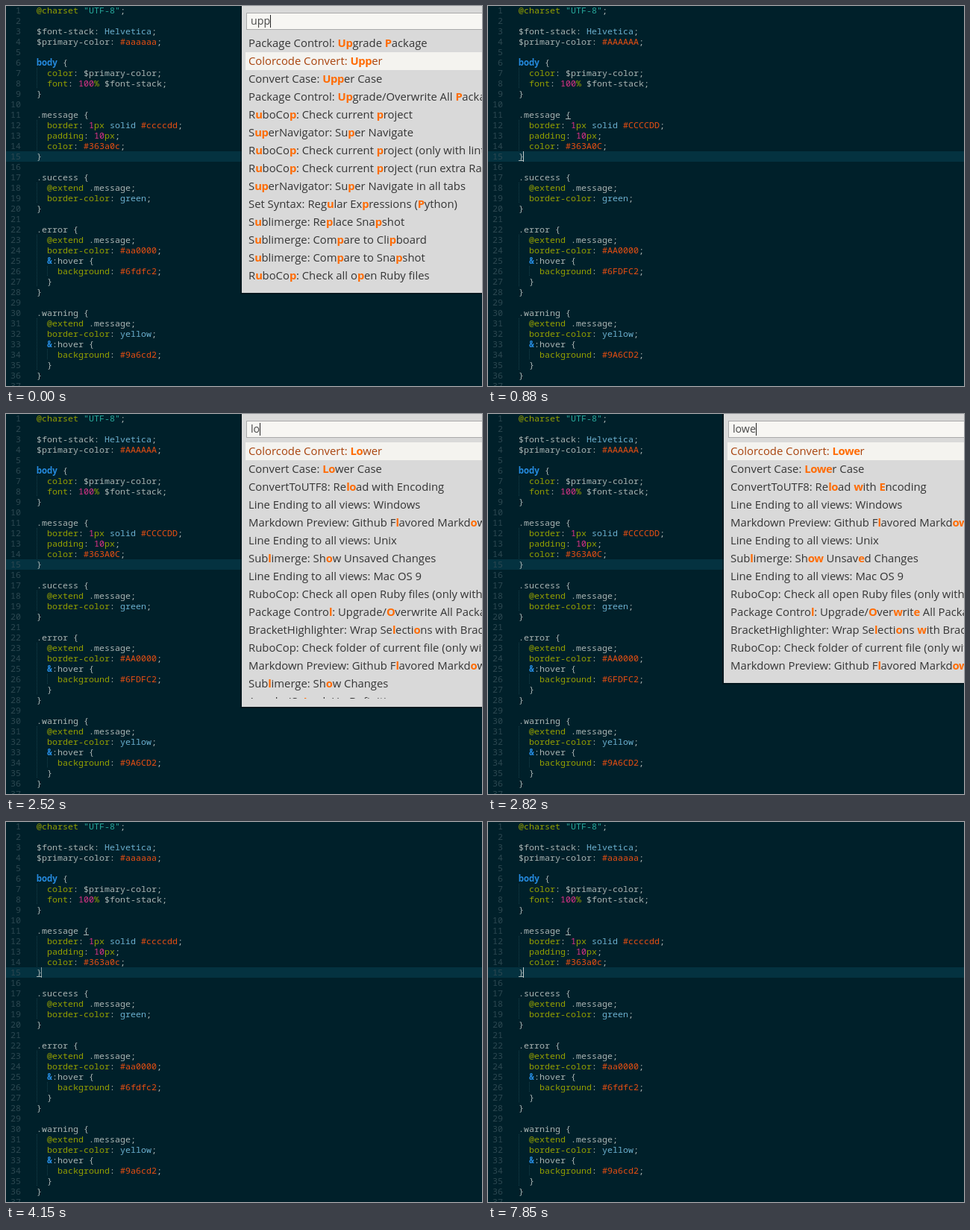
Write an HTML page that moves like this. It is 638 px wide and 510 px high and loops after 8 s.

```html
<!DOCTYPE html>
<html lang="en">
<head>
<meta charset="utf-8">
<title>Colour code case conversion</title>
<style>
  html, body { margin: 0; width: 100%; height: 100%; overflow: hidden; background: #00202a; }
  svg { display: block; width: 638px; height: 510px; }
  text { white-space: pre; }
  .code { font: 11.667px "Noto Sans Mono", monospace; fill: #a9b4b3; }
  .num { fill: #2c4851; text-anchor: end; }
  .str { fill: #27aa9d; }
  .hex { fill: #e84f12; }
  .dig { fill: #dc3388; }
  .prop, .unit { fill: #94a000; }
  .tag { fill: #258be0; font-weight: 700; }
  .word { fill: #6cb1d0; }
  .guide { stroke: #17404a; stroke-dasharray: 1 1; }
  .item { font: 14.85px "Open Sans", "Noto Sans", sans-serif; fill: #353535; }
  .item.on { fill: #a8420c; }
  .hit { fill: #ff6c05; font-weight: 700; letter-spacing: -.4px; }
  .query { font: 14.2px "Open Sans", "Noto Sans", sans-serif; fill: #484848; }
</style>
</head>
<body>
<svg viewBox="0 0 638 510">
  <clipPath id="view"><rect id="viewBox" x="318" y="38" width="320"/></clipPath>
  <rect width="638" height="510" fill="#00202a"/>
  <rect y="195" width="638" height="14" fill="#043240"/>
  <g id="editor"></g>
  <g id="focus" fill="#a9b4b3">
    <rect x="104" y="151" width="7" height="1"/>
    <rect x="41" y="207" width="7" height="1"/>
    <rect id="caret" x="47" y="195" width="1" height="14" fill="#c3cccb"/>
  </g>
  <g id="panel">
    <rect id="shade" x="314" y="-4" width="340" fill="#000" opacity=".3"/>
    <rect id="sheet" x="316" y="-4" width="340" fill="#d9d9d9"/>
    <rect x="322.5" y="9.5" width="340" height="22" fill="#f7f6f3" stroke="#aaa"/>
    <text id="query" class="query" x="328" y="25"></text>
    <rect id="bar" y="12" width="1" height="17" fill="#222"/>
    <g id="list" clip-path="url(#view)"></g>
  </g>
</svg>
<script>
const LOOP = 8000, ROW = 24, TOP = 38;
const $ = id => document.getElementById(id);

function add(parent, tag, attrs, text = '') {
  const el = document.createElementNS('http://www.w3.org/2000/svg', tag);
  for (const key in attrs) el.setAttribute(key, attrs[key]);
  el.textContent = text;
  return parent.appendChild(el);
}

const source = `@charset "UTF-8";

$font-stack: Helvetica;
$primary-color: #aaaaaa;

body {
  color: $primary-color;
  font: 100% $font-stack;
}

.message {
  border: 1px solid #ccccdd;
  padding: 10px;
  color: #363a0c;
}

.success {
  @extend .message;
  border-color: green;
}

.error {
  @extend .message;
  border-color: #aa0000;
  &:hover {
    background: #6fdfc2;
  }
}

.warning {
  @extend .message;
  border-color: yellow;
  &:hover {
    background: #9a6cd2;
  }
}
`;

const token = new RegExp([
  '(?<str>"[^"]*")', '(?<hex>#[0-9a-f]{6})', '(?<plain>\\$[\\w-]+|[.:]\\w+)',
  '(?<dig>\\d+)', '(?<unit>px|%)', '(?<tag>body|&)',
  '(?<prop>@\\w+|[a-z-]+(?=:))', '(?<word>[\\w-]+)', '(?<rest>[^\\w]?)'
].join('|'), 'g');

source.split('\n').forEach((line, i) => {
  const g = $('editor'), top = 14 * i - 1, y = top + 11;
  const indent = line.search(/\S|$/);
  add(g, 'text', { class: 'code num', x: 20, y }, i + 1);
  for (let k = 0; k < indent; k += 2) {
    const x = 41.5 + 7 * k;
    add(g, 'line', { class: 'guide', x1: x, x2: x, y1: top, y2: top + 14 });
  }
  const row = add(g, 'text', { class: 'code', x: 41 + 7 * indent, y });
  for (const m of line.trim().matchAll(token)) {
    const kind = Object.keys(m.groups).find(k => m.groups[k]);
    if (kind) add(row, 'tspan', { class: kind }, m[0]);
  }
});
const hexes = [...document.querySelectorAll('.hex')];

// Square brackets mark the matched letters.
const upp = `Package Control: [Up]grade [P]ackage
Colorcode Convert: [Upp]er
Convert Case: [Upp]er Case
Package Control: [Up]grade/Overwrite All [P]ackages
R[u]boCo[p]: Check current [p]roject
S[up]erNavigator: Su[p]er Navigate
R[u]boCo[p]: Check current [p]roject (only with lint cops)
R[u]boCo[p]: Check current [p]roject (run extra Rails cops)
S[up]erNavigator: Su[p]er Navigate in all tabs
Set Syntax: Reg[u]lar Ex[p]ressions ([P]ython)
S[u]blimerge: Re[p]lace Sna[p]shot
S[u]blimerge: Com[p]are to Cli[p]board
S[u]blimerge: Com[p]are to Sna[p]shot
R[u]boCo[p]: Check all o[p]en Ruby files`;

const uppe = `Colorcode Convert: [Uppe]r
Convert Case: [Uppe]r Case
Package Control: [Up]grade [P]ackag[e]
Package Control: [Up]grade/Overwrite All [P]ackag[e]s
S[up]erNavigator: Su[pe]r Navigate
S[up]erNavigator: Su[pe]r Navigate in all tabs
R[u]boCo[p]: Check current [p]roj[e]ct
Set Syntax: Reg[u]lar Ex[p]ressions ([P]ython)`;

const upper = `Colorcode Convert: [Upper]
Convert Case: [Upper] Case
S[up]erNavigator: Su[per] Navigate
S[up]erNavigator: Su[per] Navigate in all tabs`;

const all = `About
AngularJS: Delete Cache
AngularJS: Look Up Definition
AngularJS: Rebuild Search Index
AngularJS: Toggle – Disable All Completions
AngularJS: Toggle – Disable Built-in Directive Completions
AngularJS: Toggle – Disable Built-in Element Completions
AngularJS: Toggle – Disable Indexed Directive Completions
AngularJS: Toggle – Disable Indexed Isolate Completions
AngularJS: Toggle – Disable JS Completions
AngularJS: Toggle – Enable data– Prefix
Autoprefix CSS
Bookmarks: Clear All
Bookmarks: Select All
Bookmarks: Select None`;

const lowe = `Colorcode Convert: [Lowe]r
Convert Case: [Lowe]r Case
ConvertToUTF8: Re[lo]ad [w]ith [E]ncoding
Line Ending to all views: Windows
Markdown Preview: Github F[l]avored Markd[ow]n
Line Ending to all views: Unix
Sub[l]imerge: Sh[ow] Unsav[e]d Changes
Line Ending to all views: Mac OS 9
RuboCop: Check all open Ruby files (only with lint cops)
Package Contro[l]: Upgrade/[O]ver[w]rit[e] All Packages
BracketHighlighter: Wrap Se[l]ecti[o]ns [w]ith Brack[e]ts
RuboCop: Check folder of current file (only with lint cops)
Markdown Preview: Github F[l]avored Markd[ow]n`;

const low = lowe.replace('[Lowe]r\n', '[Low]er\n').replace('[Lowe]r Case', '[Low]er Case')
  .replace(/\[[eE]\]/g, s => s[1]) + '\nSub[l]imerge: Sh[ow] Changes';
const lo = low.replace(/\[Low\]/g, '[Lo]w').replace(/\[ow\]/g, '[o]w').replace(/\[w\]/g, 'w')
  + '\nAngularJS: [Lo]ok Up Definition';

const lower = `Colorcode Convert: [Lower]
Convert Case: [Lower] Case
Markdown Preview: Github F[l]avored Markd[ow]n
Package Control: Upgrade/Overwrite All Packages
Markdown Preview: Github F[l]avored Markdown`;

// start, query (null when closed), items, caret x, selected row
const scenes = [
  [0, 'upp', upp, 354, 1],
  [290, 'uppe', uppe, 362, 0],
  [440, 'upper', upper, 368, 0],
  [730, null],
  [1920, '', all, 327, 0],
  [2520, 'lo', lo, 340, 0],
  [2670, 'low', low, 351, 0],
  [2820, 'lowe', lowe, 359, 0],
  [2960, 'lower', lower, 365, 0],
  [3860, null]
];

// start, caret opacity
const blink = [
  [0, 1], [1330, .5], [1470, 0], [1920, 1], [3410, .5], [3560, 0], [3860, 1],
  [4150, .7], [4290, .3], [4440, 0], [4890, .5], [5040, 1], [5180, .5], [5330, 0],
  [5930, 1], [6360, 0], [6810, .5], [6950, 1], [7250, .5], [7400, 0], [7850, 1]
];

const at = (steps, t) => steps.findLast(s => s[0] <= t);

function showPanel([, query, items, barX, selected]) {
  const rows = items.split('\n'), list = $('list');
  const height = Math.min(rows.length * ROW, 344), bottom = TOP + height + 11;
  $('sheet').setAttribute('height', bottom + 4);
  $('shade').setAttribute('height', bottom + 6);
  $('viewBox').setAttribute('height', height);
  $('query').textContent = query;
  $('bar').setAttribute('x', barX);
  list.replaceChildren();
  add(list, 'rect', { x: 321, y: TOP + selected * ROW, width: 330, height: ROW, fill: '#f4f3ef' });
  rows.forEach((row, i) => {
    const text = add(list, 'text', {
      class: i === selected ? 'item on' : 'item', x: 325, y: TOP + i * ROW + 17
    });
    row.split(/[[\]]/).forEach((part, k) =>
      part && add(text, 'tspan', k % 2 ? { class: 'hit' } : {}, part));
  });
}

let current;
function draw(now) {
  const t = now % LOOP, scene = at(scenes, t), alpha = at(blink, t)[1];
  if (scene !== current) {
    current = scene;
    const open = scene[1] !== null;
    $('panel').style.display = open ? '' : 'none';
    $('focus').style.display = open ? 'none' : '';
    if (open) showPanel(scene);
    const big = t >= 730 && t < 3860;
    for (const h of hexes) {
      h.textContent = big ? h.textContent.toUpperCase() : h.textContent.toLowerCase();
    }
  }
  $('caret').style.opacity = $('bar').style.opacity = alpha;
}

const start = performance.now();
function tick() {
  draw(performance.now() - start);
  requestAnimationFrame(tick);
}
tick();
</script>
</body>
</html>
```
